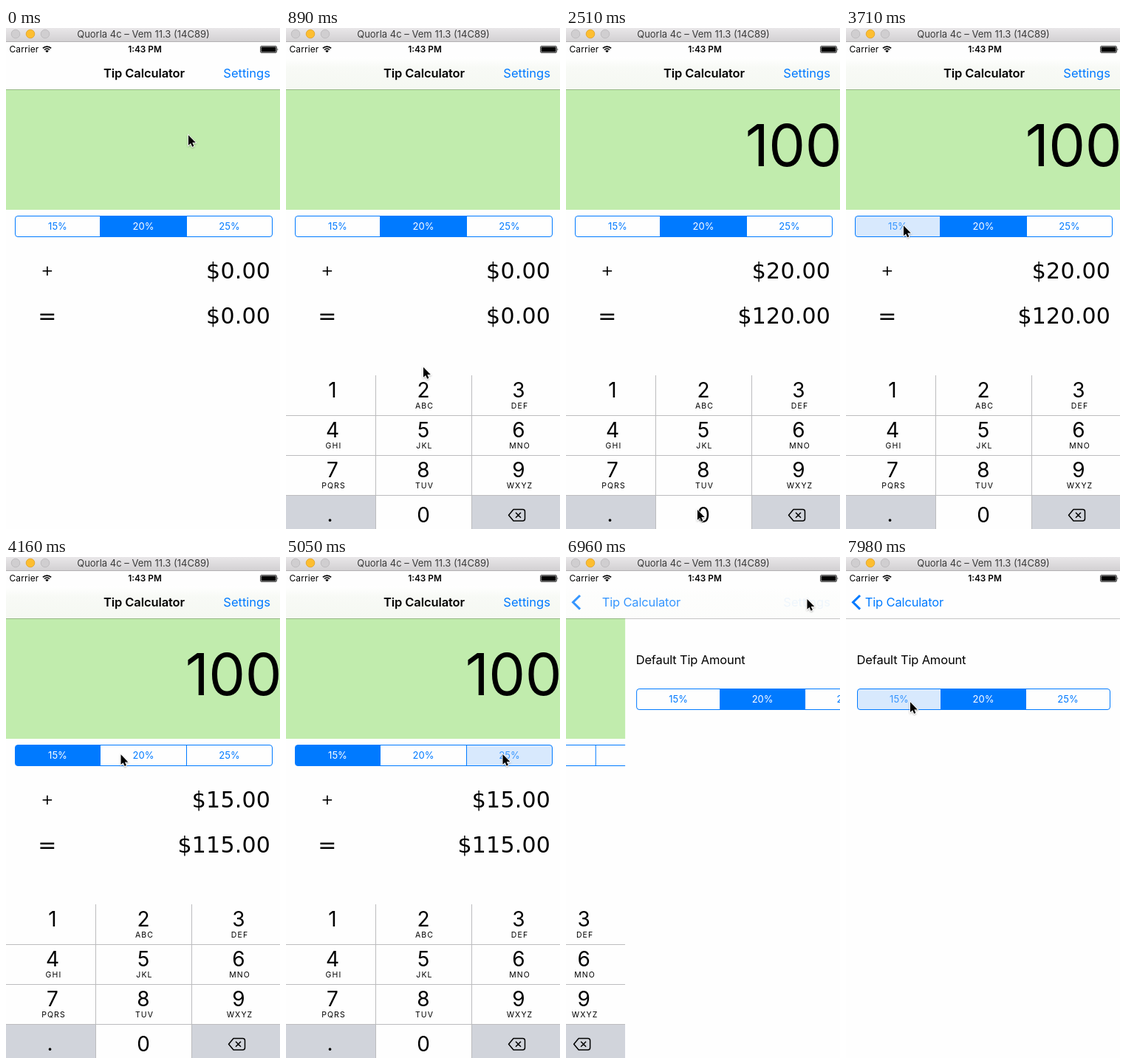
Animation, 371 px wide and 678 px high, one loop 8 s. Source, as an HTML page:

```html
<!DOCTYPE html>
<html lang="en">
<head>
<meta charset="utf-8">
<title>Tip Calculator</title>
<style>
  html, body { margin: 0; width: 100%; height: 100%; overflow: hidden; background: #fefefe; }
  svg { display: block; width: 371px; height: 678px; font-family: Inter, sans-serif; }
  .mid { text-anchor: middle; }
  .end { text-anchor: end; }
  .num { font-family: "DejaVu Sans", sans-serif; font-size: 30px; letter-spacing: .2px; }
  .nav { font-size: 16.5px; letter-spacing: -.16px; }
  .blue { fill: #007aff; }
</style>
</head>
<body>
<svg id="stage" viewBox="0 0 371 678">
  <defs>
    <linearGradient id="chrome" x2="0" y2="1">
      <stop stop-color="#e9e7e9"/><stop offset="1" stop-color="#d2d0d2"/>
    </linearGradient>
    <linearGradient id="tint" x2="0" y2="1">
      <stop stop-color="#fff"/><stop offset=".3" stop-color="#f8faf6"/><stop offset="1" stop-color="#f5f8f2"/>
    </linearGradient>
    <filter id="soft" x="-50%" y="-50%" width="200%" height="200%">
      <feDropShadow dx="0" dy="1" stdDeviation="1" flood-opacity=".35"/>
    </filter>
  </defs>

  <g id="home">
    <rect y="83" width="371" height="595" fill="#fefefe"/>
    <rect y="83" width="371" height="163" fill="#c1ecad"/>
    <text id="bill" class="end" x="373" y="187" font-size="79" letter-spacing="-.5"></text>
    <g id="rates"></g>
    <text class="num mid" x="56" y="334.5" style="font-size:20px">+</text>
    <text class="num mid" x="56" y="400">=</text>
    <text id="tip" class="num end" x="358" y="339.4"></text>
    <text id="total" class="num end" x="358" y="400.4"></text>
  </g>

  <g id="keys"></g>

  <g id="prefs">
    <rect y="83" width="371" height="595" fill="#fefefe"/>
    <text class="nav" x="14.5" y="145.2">Default Tip Amount</text>
    <g id="defaults"></g>
  </g>

  <rect y="18" width="371" height="65" fill="#fefefe"/>
  <rect id="tinted" y="40" width="371" height="43" fill="url(#tint)"/>
  <path d="M0 83.5H371" stroke="#000" stroke-opacity=".22"/>
  <text id="title" class="nav mid" x="187" y="67" font-weight="600" style="letter-spacing:-.1px">Tip Calculator</text>
  <text id="settings" class="nav blue" x="294.3" y="67" style="letter-spacing:0">Settings</text>
  <g id="back">
    <path id="chevron" d="M19 52L9.5 61.3L19 70.6" fill="none" stroke="#007aff" stroke-width="3"/>
    <text id="backText" class="nav blue" x="25.8" y="67">Tip Calculator</text>
  </g>

  <text x="4.5" y="33" font-size="12" letter-spacing=".1">Carrier</text>
  <path d="M49.9 27.4A8 8 0 0 1 61.1 27.4M52 29.5A5 5 0 0 1 59 29.5" fill="none" stroke="#000" stroke-width="1.7"/>
  <path d="M53.2 31L55.5 33.3L57.8 31A3.3 3.3 0 0 0 53.2 31Z"/>
  <text class="mid" x="188" y="33" font-size="11.8" font-weight="600">1:43 PM</text>
  <rect x="344.5" y="24.5" width="22" height="9" rx="1.5" fill="#fff" stroke="#000" stroke-width=".7"/>
  <rect x="345.5" y="25.5" width="20" height="7" rx=".5"/>
  <path d="M367.6 27.3Q369.2 29 367.6 30.7Z"/>

  <rect width="371" height="18.5" fill="url(#chrome)"/>
  <path d="M0 18.5H371" stroke="#b3b1b3"/>
  <g stroke-width=".8">
    <circle cx="13" cy="8" r="5.8" fill="#d0ced0" stroke="#b9b7b9"/>
    <circle cx="33" cy="8" r="5.8" fill="#fdbe30" stroke="#dfa023"/>
    <circle cx="53" cy="8" r="5.8" fill="#d0ced0" stroke="#b9b7b9"/>
  </g>
  <text class="mid" x="186" y="13" font-size="13" fill="#3a3a3a">Quorla 4c – Vem 11.3 (14C89)</text>

  <path id="cursor" d="M0 0V13.8L3.1 10.9L5.2 15.8L7.4 14.8L5.3 10.1H9.8Z" stroke="#fff" stroke-width="1.4" paint-order="stroke" filter="url(#soft)"/>
</svg>
<script>
const W = 371, LOOP = 8000, BLUE = '#007aff', GREY = '#d1d4db';
const $ = id => document.getElementById(id);
const move = (id, x, y = 0) => $(id).setAttribute('transform', `translate(${x} ${y})`);
const fade = (id, o) => $(id).setAttribute('opacity', o);
const RATES = [15, 20, 25];

// Segmented control; edges are the left side, both dividers and the right side.
function segments(id, edges, top) {
  const [l, , , r] = edges;
  const frame = `x="${l}" y="${top}" width="${r - l}" height="28" rx="3.5"`;
  const cells = RATES.map((v, i) =>
    `<rect class="cell" x="${edges[i]}" y="${top}" width="${edges[i + 1] - edges[i]}" height="28"/>`).join('');
  const labels = RATES.map((v, i) =>
    `<text class="mid" x="${(edges[i] + edges[i + 1]) / 2}" y="${top + 18.5}" font-size="13">${v}%</text>`).join('');
  $(id).innerHTML = `<clipPath id="${id}Clip"><rect ${frame}/></clipPath>
    <g clip-path="url(#${id}Clip)">${cells}</g>
    <rect ${frame} fill="none" stroke="${BLUE}"/>
    <path d="M${edges[1]} ${top}v28M${edges[2]} ${top}v28" stroke="${BLUE}"/>${labels}`;
  const fills = $(id).querySelectorAll('.cell'), texts = $(id).querySelectorAll('text');
  return (selected, pressed) => RATES.forEach((v, i) => {
    fills[i].setAttribute('fill', i === selected ? BLUE : i === pressed ? '#d8e9fd' : '#fefefe');
    texts[i].setAttribute('fill', i === selected ? '#fff' : BLUE);
    texts[i].setAttribute('opacity', i === pressed ? .75 : 1);
  });
}

function buildKeys() {
  const letters = ['', 'ABC', 'DEF', 'GHI', 'JKL', 'MNO', 'PQRS', 'TUV', 'WXYZ'];
  const mids = [63, 186, 315];
  const digits = letters.map((s, i) => {
    const x = mids[i % 3], y = 500 + 54 * Math.floor(i / 3);
    return `<text class="mid" x="${x}" y="${y}" font-size="28">${i + 1}</text>
      <text class="mid" x="${x + 1.5}" y="${y + 15}" font-size="10.5" letter-spacing="1.1">${s}</text>`;
  }).join('');
  $('keys').innerHTML = `<rect y="470" width="${W}" height="208" fill="#fefefe"/>
    <rect id="key1" y="470" width="121" height="54" fill="${GREY}"/>
    <rect id="key0" x="122" y="633" width="129" height="45" fill="${GREY}"/>
    <path d="M0 632.5H121.5V678H0ZM251.5 632.5H371V678H251.5Z" fill="${GREY}"/>
    <path d="M0 524.5H371M0 578.5H371M0 632.5H371M121.5 470V678M251.5 470V678" stroke="#bcbcbe"/>
    ${digits}
    <text class="mid" x="186" y="669" font-size="28">0</text>
    <text class="mid" x="59.5" y="668" font-size="28">.</text>
    <path d="M308 651.5H320.5Q323.5 651.5 323.5 654.5V664Q323.5 667 320.5 667H308L301.5 659.2Z
      M311 655.7L318 662.8M318 655.7L311 662.8" fill="none" stroke="#000" stroke-width="1.5" stroke-linejoin="round"/>`;
}

// Bursts of change: start, span, number of gaps.
const BURSTS = [[0, 0, 0], [300, 1030, 7], [1470, 440, 3], [2210, 300, 2], [2810, 600, 4], [3710, 890, 6],
  [4900, 1020, 7], [6070, 0, 0], [6370, 0, 0], [6810, 1030, 7], [7980, 0, 0]];
// Time, bill, chosen rate.
const ENTRIES = [[0, 0, 1], [1620, 1, 1], [2360, 10, 1], [2510, 100, 1], [3860, 100, 0], [5190, 100, 2]];
// Time, x, y of the pointer tip.
const POINTER = [[0, 247, 145], [450, 247, 145], [890, 186, 459], [1330, 58, 494], [1620, 58, 494],
  [1910, 178, 652], [2660, 178, 652], [3410, 78, 267.5], [3860, 78, 267.5], [4600, 293.5, 267],
  [5190, 293.5, 267], [5920, 331, 103], [6070, 326.5, 57], [6960, 326.5, 57], [7840, 87, 196.3], [LOOP, 87, 196.3]];

const clamp = u => Math.max(0, Math.min(1, u));
const easeOut = u => 1 - (1 - clamp(u)) ** 3;
const smooth = u => u * u * (3 - 2 * u);
const lastAt = (table, t) => table.filter(row => row[0] <= t).pop();
const within = (t, a, b) => t >= a && t < b;
const money = v => '$' + v.toFixed(2);

function snap(t) {
  const [start, span, gaps] = lastAt(BURSTS, t);
  if (!gaps) return start;
  const k = Math.floor(clamp((t - start) / span) * gaps + .06);
  return Math.round((start + k / gaps * span) / 10) * 10;
}

function pointer(t) {
  const i = Math.max(1, POINTER.findIndex(p => p[0] > t));
  const [a, b] = [POINTER[i - 1], POINTER[i]];
  const u = smooth((t - a[0]) / (b[0] - a[0]));
  return [a[1] + (b[1] - a[1]) * u, a[2] + (b[2] - a[2]) * u];
}

buildKeys();
const setRate = segments('rates', [12.5, 127.5, 244.5, 360.5], 254.5);
const setDefault = segments('defaults', [15.5, 128.5, 243.5, 357.5], 178.5);

function render(time) {
  const t = snap(time);
  const [, bill, rate] = lastAt(ENTRIES, t);
  const tip = bill * RATES[rate] / 100;
  $('bill').textContent = bill || '';
  $('tip').textContent = money(tip);
  $('total').textContent = money(bill + tip);
  setRate(rate, within(t, 3710, 3860) ? 0 : within(t, 4900, 5190) ? 2 : -1);
  setDefault(1, t >= 7980 ? 0 : -1);
  fade('key1', +within(t, 1470, 1620));
  fade('key0', +within(t, 2210, 2510));

  const push = easeOut((t - 6740) / 550);
  const rise = easeOut((t - 250) / 350);
  move('home', -.3 * W * push);
  move('keys', -W * push, 208 * (1 - rise));
  move('prefs', W * (1 - push));
  fade('tinted', rise * (1 - push));
  fade('settings', (t >= 6370 ? .25 : 1) * (1 - push));
  move('title', -106 * push);
  fade('title', clamp(1 - push * 1.5));
  move('backText', 106 * (1 - push));
  fade('back', push);
  move('cursor', ...pointer(t));
}

function tick() {
  render(performance.now() % LOOP);
  requestAnimationFrame(tick);
}
tick();
</script>
</body>
</html>
```
